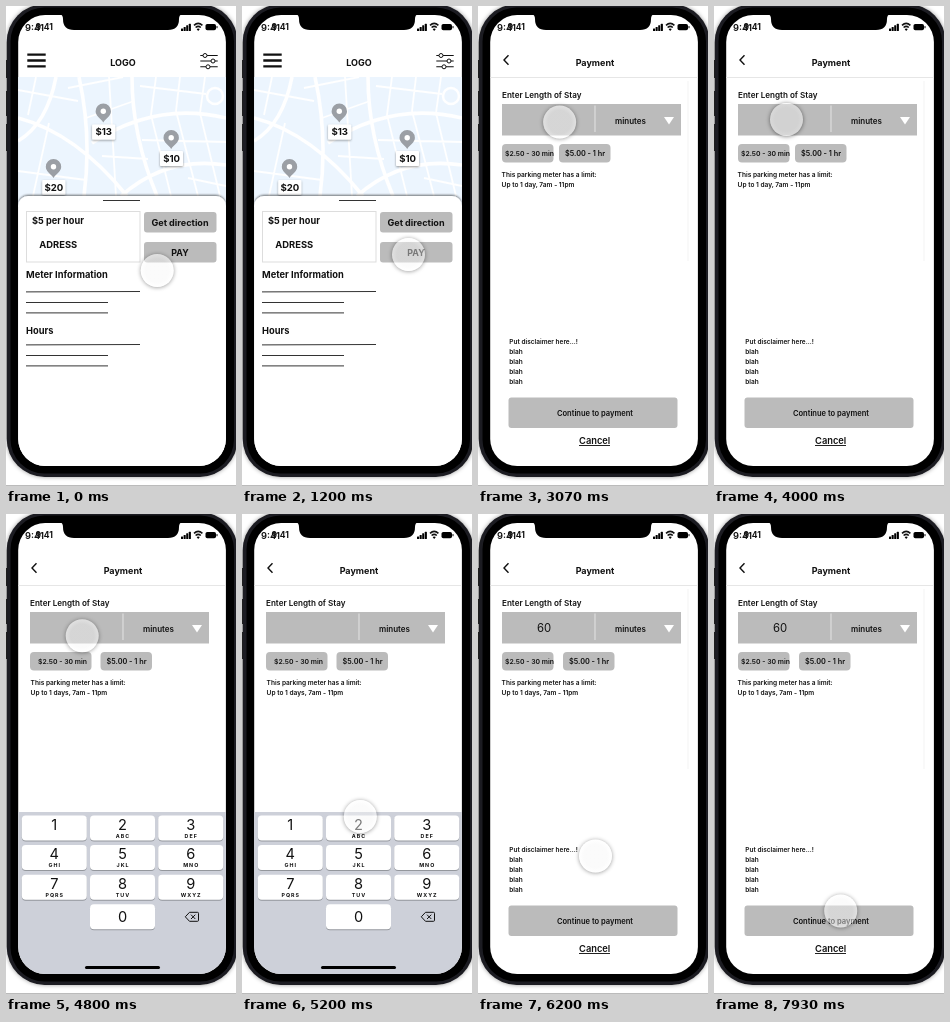
Recreate the animation shown at these times as an HTML page. Size 230 by 480 pixels, loop 8 s.

```html
<!DOCTYPE html>
<html lang="en">
<head>
<meta charset="utf-8">
<title>Parking payment prototype</title>
<style>
html, body { margin: 0; width: 100%; height: 100%; overflow: hidden; background: #fff; }
svg { position: absolute; left: 0; top: 0; width: 230px; height: 480px; }
text { font-family: Inter, Roboto, sans-serif; font-weight: 600; fill: #111; white-space: pre; }
.bold { font-weight: 700; }
.digit { font-weight: 400; }
.grey { fill: #bbb; }
.rule { stroke: #333; stroke-width: 1; }
.line { fill: none; stroke: #111; }
#cursor {
  position: absolute; left: -16.5px; top: -16.5px; width: 33px; height: 33px; border-radius: 50%;
  background: radial-gradient(rgba(246,246,246,.45) 50%, rgba(255,255,255,.55) 70%);
  box-shadow: 0 .5px 4px rgba(0,0,0,.4);
}
#cursor.pressed {
  background: radial-gradient(rgba(238,238,238,.45) 50%, rgba(246,246,246,.5) 70%);
  box-shadow: 0 .5px 4px rgba(0,0,0,.5);
}
</style>
</head>
<body>
<svg viewBox="0 0 230 480">
  <defs>
    <clipPath id="glass"><rect x="12.2" y="9" width="207.7" height="451" rx="27"/></clipPath>
    <clipPath id="mapArea"><rect x="12" y="71" width="208" height="130"/></clipPath>
    <filter id="soft" x="-20%" y="-20%" width="140%" height="150%">
      <feDropShadow dx="0" dy="1" stdDeviation="1" flood-opacity=".4"/>
    </filter>
    <filter id="lift" x="-5%" y="-5%" width="110%" height="110%">
      <feDropShadow dx="0" dy="-1" stdDeviation="1.3" flood-opacity=".55"/>
    </filter>
    <filter id="glow" x="-5%" y="-5%" width="110%" height="110%">
      <feDropShadow dx="0" dy="0" stdDeviation="2" flood-opacity=".4"/>
    </filter>
  </defs>
  <path d="M0 479.5H230" stroke="#bbb"/>
  <path d="M.5 54v18M.5 85v25M.5 118v27" stroke="#222"/>
  <rect x=".7" y="-2" width="231" height="473" rx="38" fill="#1b1b20" filter="url(#glow)"/>
  <rect x="4.5" y="1.5" width="223.5" height="466" rx="34"/>
  <g clip-path="url(#glass)">
    <rect x="12" y="9" width="208" height="451" fill="#fff"/>
    <g id="screens"></g>
  </g>
  <path d="M54 8H176Q173 9 173 13Q173 24 162 24H68Q57 24 57 13Q57 9 54 8Z"/>
  <g id="status"></g>
</svg>
<div id="cursor"></div>
<script>
const $ = id => document.getElementById(id);
const text = (x, y, size, str, attrs = '') =>
  `<text x="${x}" y="${y}" font-size="${size}" ${attrs}>${str}</text>`;
const mid = (x, y, size, str, attrs = '') => text(x, y, size, str, 'text-anchor="middle" ' + attrs);
const box = (x, y, w, h, r = 3, attrs = 'class="grey"') =>
  `<rect x="${x}" y="${y}" width="${w}" height="${h}" rx="${r}" ${attrs}/>`;
const path = (d, attrs) => `<path d="${d}" ${attrs}/>`;
const BOLD = 'class="bold"', DIGIT = 'class="digit"';

function statusBar() {
  let bars = '';
  for (let i = 0; i < 4; i++) bars += box(175 + i * 2.6, 22.5 - i * 1.6, 2.1, 2.5 + i * 1.6, .5, '');
  return text(19, 24.5, 9.4, '9:41') + text(29.5, 24, 8.5, '9:41', BOLD) + bars +
    path('M188 19.3Q192.2 15.5 196.4 19.3M189.6 21.5Q192.2 19.3 194.8 21.5', 'class="line" stroke-width="1.6"') +
    path('M190.6 23L192.2 25L193.8 23Q192.2 21.8 190.6 23Z', '') +
    box(199.5, 18, 10.5, 6.2, 1.8, '') + box(210.5, 20, 1, 2.3, .5, '');
}

function pin(x, y, price) {
  return path(`M${x} ${y + 10.5}C${x - 3} ${y + 6} ${x - 7.7} ${y + 4} ${x - 7.7} ${y - .7}` +
      `A7.7 7.7 0 0 1 ${x + 7.7} ${y - .7}C${x + 7.7} ${y + 4} ${x + 3} ${y + 6} ${x} ${y + 10.5}Z`, 'fill="#9b9fa5"') +
    `<circle cx="${x}" cy="${y - .7}" r="2.7" fill="#fff"/>` +
    box(x - 11.2, y + 12.5, 23, 15, 1, 'fill="#fff" filter="url(#soft)"') +
    mid(x + .4, y + 23.4, 9.6, price, BOLD);
}

function mapView() {
  const wide = 'M12 135Q41 118 50 71M12 112Q70 127 121 190M73 71Q86 130 78 190M86 137Q150 95 220 112M126 71Q126 130 151 190M220 159Q160 150 115 190';
  const thin = 'M12 84L72 95M30 71L22 109M43 117L27 190M12 165L80 174M62 82L117 71M80 112L128 95M103 71L110 190' +
    'M134 80L200 88M150 71L145 109L165 190M174 71L170 105L192 190M199 71L194 107L214 190M136 134L220 136M96 150L142 153M182 172L220 180';
  return '<g clip-path="url(#mapArea)">' +
    '<rect x="12" y="71" width="208" height="130" fill="#ecf5fe"/>' +
    path(wide, 'fill="none" stroke="#fff" stroke-width="3.6"') +
    path(thin, 'fill="none" stroke="#fff" stroke-width="1.8"') +
    '<circle cx="209" cy="90" r="8" fill="none" stroke="#fff" stroke-width="2.5"/>' +
    '</g>' + pin(97.3, 106, '$13') + pin(165.2, 132.5, '$10') + pin(47.5, 161.5, '$20');
}

function section(title, y, lineY) {
  return text(20, y, 9.3, title, BOLD) +
    path(`M20 ${lineY}L134 ${lineY - .4}M20 ${lineY + 10.6}H102M20 ${lineY + 21}H102`, 'class="rule"');
}

function mapScreen() {
  return path('M21.3 48.6H39.7M21.3 54.5H39.7M21.3 60.4H39.7', 'class="line" stroke-width="2.4"') +
    mid(117, 59.8, 9, 'LOGO', BOLD) +
    path('M194.3 49.5H211.7M194.3 55H211.7M194.3 60.8H211.7', 'class="line" stroke-width="1.1"') +
    [[199, 49.5], [207, 55], [202, 60.8]].map(([x, y]) =>
      `<circle cx="${x}" cy="${y}" r="2" fill="#fff" stroke="#111"/>`).join('') +
    mapView() +
    box(12, 190, 208, 290, 10, 'fill="#fff" filter="url(#lift)"') +
    path('M97 194.5H134', 'stroke="#333"') +
    box(20.5, 205.5, 113.5, 50.5, 0, 'fill="#fff" stroke="#ddd"') +
    text(26, 217.7, 9.2, '$5 per hour', BOLD) + text(33.3, 242, 9.4, 'ADRESS', BOLD) +
    box(138, 206, 72.5, 20.5) + mid(174, 219.5, 9.1, 'Get direction', BOLD) +
    box(138, 236, 72.5, 20.5) + mid(174, 249.5, 8.9, 'PAY', BOLD) +
    section('Meter Information', 272, 285.9) + section('Hours', 328, 338.9);
}

function paymentHeader({ chip1, chip2, limitX = 24, days = 'days', amount = '' }) {
  const chip = ([x, w, pad], size, label) =>
    box(x, 138, w, 18.5, 4) + text(x + pad, 149.8, size, label);
  return path('M30.5 49.3L26 54L30.5 58.7', 'class="line" stroke-width="1.4"') +
    mid(117, 59.5, 9, 'Payment', BOLD) +
    path('M12 71.5H220', 'stroke="#e6e6e6"') +
    text(24, 91.7, 8.1, 'Enter Length of Stay') +
    box(24, 98, 179, 31.5, 0) + path('M117 99.5V126', 'stroke="#e4e4e4"') +
    mid(152.5, 117.5, 8, 'minutes') + path('M186 111H196L191 118.5Z', 'fill="#fff"') +
    mid(66, 118, 11.3, amount, DIGIT) +
    chip(chip1, 6.85, '$2.50 - 30 min') + chip(chip2, 7.3, '$5.00 - 1 hr') +
    text(limitX - .4, 171, 6.55, 'This parking meter has a limit:') +
    text(limitX - .4, 181, 6.55, `Up to 1 ${days}, 7am - 11pm`);
}

function paymentFooter() {
  const lines = ['Put disclaimer here...!', 'blah', 'blah', 'blah', 'blah'];
  return path('M210 75V255', 'stroke="#f3f3f3"') +
    lines.map((line, i) => text(31.3, 337.7 + i * 10, 6.5, line)).join('') +
    box(30.5, 391.5, 169, 30.5) + mid(117, 409.8, 7.55, 'Continue to payment') +
    mid(116.7, 437.5, 9.3, 'Cancel') + path('M101 439.5H132', 'stroke="#222"');
}

function keypad() {
  const letters = ['', 'ABC', 'DEF', 'GHI', 'JKL', 'MNO', 'PQRS', 'TUV', 'WXYZ'];
  const key = (col, row, digit, sub) => {
    const x = 15.8 + col * 68.2, y = 301.5 + row * 29.6;
    return box(x, y + 1, 65, 25, 4, 'fill="#94979d"') + box(x, y, 65, 25, 4, 'fill="#fff"') +
      mid(x + 32.5, y + (sub === null ? 17.3 : 14.1), 14.6, digit, DIGIT) +
      (sub ? mid(x + 33, y + 22.3, 5.3, sub, 'letter-spacing="1" ' + BOLD) : '');
  };
  return box(12, 298, 208, 162, 0, 'fill="#cdd0d9"') +
    letters.map((sub, i) => key(i % 3, Math.floor(i / 3), i + 1, sub)).join('') +
    key(1, 3, 0, null) +
    path('M183.5 398.3H191.5Q192.5 398.3 192.5 399.3V406.3Q192.5 407.3 191.5 407.3H183.5L179.3 402.8Z' +
      'M185 400.7L189.3 405M189.3 400.7L185 405', 'class="line" stroke-width="1"') +
    box(79, 452, 75, 3, 1.5, '');
}

const screens = [
  { from: 0, html: mapScreen() },
  { from: 1330, html: paymentHeader({ chip1: [24, 51.5, 3], chip2: [81, 51.5, 6], days: 'day' }) + paymentFooter() },
  { from: 4130, html: paymentHeader({ chip1: [24, 61.5, 8], chip2: [94.5, 51.5, 6], limitX: 25 }) + keypad() },
  { from: 6070, html: paymentHeader({ chip1: [24, 51.5, 3], chip2: [85, 51.5, 6], amount: '60' }) + paymentFooter() },
];
$('status').innerHTML = statusBar();
$('screens').innerHTML = screens.map(s => `<g>${s.html}</g>`).join('');
const layers = [...$('screens').children];

const moves = [
  { start: 0, end: 267, from: [150.7, 264], to: [166, 248] },
  { start: 2495, end: 3333, from: [166, 248], to: [75, 106] },
  { start: 3333, end: 3533, from: [75, 106], to: [72, 113] },
  { start: 4755, end: 5600, from: [72, 113], to: [117, 341.5], bend: 60 },
  { start: 7467, end: 8333, from: [117, 341.5], to: [128, 407] },
];
const presses = [[930, 1200], [3930, 4200], [5930, 6200]];

// cubic-bezier(.25, .1, .25, 1)
function ease(t) {
  const curve = (a, b, u) => 3 * a * u * (1 - u) ** 2 + 3 * b * u * u * (1 - u) + u ** 3;
  let lo = 0, hi = 1;
  for (let i = 0; i < 20; i++) {
    const u = (lo + hi) / 2;
    if (curve(.25, .25, u) < t) lo = u; else hi = u;
  }
  return curve(.1, 1, hi);
}

function cursorAt(t) {
  const { start, end, from, to, bend = 0 } = moves.findLast(m => m.start <= t);
  const s = ease(Math.min(1, (t - start) / (end - start)));
  const [x, y] = from.map((v, i) => v + (to[i] - v) * s);
  return [x + bend * s * (1 - s), y];
}

const LOOP = 8000, STEP = 1000 / 15;
const cursor = $('cursor');

function draw() {
  const t = Math.floor((performance.now() % LOOP + 4) / STEP) % 120 * STEP;
  const current = screens.findLastIndex(s => s.from <= t);
  layers.forEach((layer, i) => { layer.style.display = i === current ? '' : 'none'; });
  const [x, y] = cursorAt(t);
  cursor.style.transform = `translate(${x}px, ${y}px)`;
  cursor.classList.toggle('pressed', presses.some(([a, b]) => t >= a && t < b));
  requestAnimationFrame(draw);
}
draw();
</script>
</body>
</html>
```
